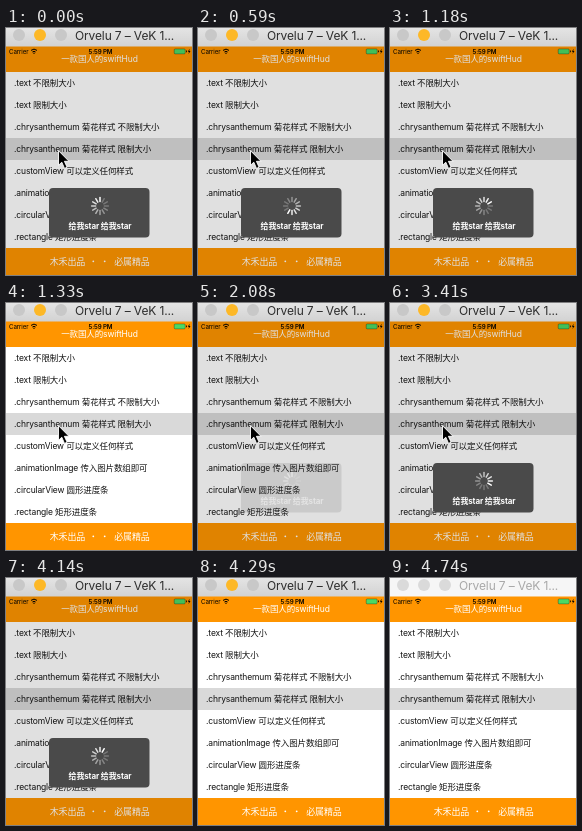
Animation, 186 px wide and 247 px high, one loop 4840 ms. Source, as an HTML page:

```html
<!DOCTYPE html>
<html lang="zh-CN">
<head>
<meta charset="utf-8">
<style>
  html, body { margin: 0; height: 100%; overflow: hidden; background: #fff; }
  svg { display: block; width: 100vw; height: 100vh; }
  text { font-family: Inter, "Noto Sans CJK SC", "Noto Sans CJK", sans-serif; letter-spacing: -.13px; white-space: pre; }
  #list { font-size: 8.5px; fill: #111; }
  .bar { fill: #ff9500; }
  .caption { font-size: 9px; fill: #fff; }
  .status { font-size: 6.2px; }
</style>
</head>
<body>
<svg viewBox="0 0 186 247">
  <defs>
    <linearGradient id="chrome" x2="0" y2="1">
      <stop stop-color="#e4e4e4"/><stop offset="1" stop-color="#d2d2d2"/>
    </linearGradient>
  </defs>
  <rect width="186" height="247" fill="#fff"/>
  <rect y="110" width="186" height="22" fill="#d9d9d9"/>
  <g id="list"></g>

  <rect class="bar" y="18" width="186" height="26"/>
  <text class="status" x="3" y="25.5">Carrier</text>
  <path d="M25 22.4q3-2.6 6 0M26.4 24q1.6-1.4 3.2 0" fill="none" stroke="#000"/>
  <circle cx="28" cy="25.2" r=".7"/>
  <text class="status" x="94.5" y="25.5" text-anchor="middle" font-weight="600">5:59 PM</text>
  <rect x="168.2" y="20.9" width="11" height="5" rx="1" fill="#4cd964" stroke="#000" stroke-width=".3"/>
  <path d="M180 22.5h.8v1.8h-.8zM183.6 20.8l-1.8 3h1.2l-.5 2.2 2-3h-1.2z"/>
  <text class="caption" x="93.5" y="34.3" text-anchor="middle" style="font-size:8.5px">一款国人的swiftHud</text>

  <rect class="bar" y="220" width="186" height="27"/>
  <text class="caption" x="43.7" y="236.5">木禾出品</text>
  <text class="caption" x="108.2" y="236.5">必属精品</text>
  <g fill="#fff"><circle cx="87.3" cy="233.3" r=".9"/><circle cx="98.7" cy="233.3" r=".9"/></g>

  <rect id="dim" y="18" width="186" height="229" opacity=".12"/>
  <g id="hud">
    <rect x="43" y="160" width="100.5" height="49.5" rx="4" fill="#4a4a4a"/>
    <g id="spinner" stroke="#fff" stroke-width="1.5" stroke-linecap="round"></g>
    <text x="94" y="201" text-anchor="middle" font-size="8" font-weight="bold" fill="#fff">给我star 给我star</text>
  </g>
  <path id="cursor" d="M52.5 122.7v14.6l3.3-3.1 2.7 6.2 2.6-1.2-2.7-5.9h4.6z" stroke="#fff" stroke-width=".9"/>

  <rect id="titleBar" width="186" height="18.5"/>
  <g id="lights"><circle cx="13" cy="7" r="6"/><circle cx="34" cy="7" r="6"/><circle cx="55" cy="7" r="6"/></g>
  <text id="title" x="69" y="12" font-size="12">Orvelu 7 – VeK 1...</text>
</svg>
<script>
const LOOP = 4840, TICK = 148;
const $ = id => document.getElementById(id);
const show = (id, on) => $(id).setAttribute('visibility', on ? 'visible' : 'hidden');
const fill = (node, color) => node.setAttribute('fill', color);

const rows = ['.text 不限制大小', '.text 限制大小', '.chrysanthemum 菊花样式 不限制大小',
  '.chrysanthemum 菊花样式 限制大小', '.customView 可以定义任何样式',
  '.animationImage 传入图片数组即可', '.circularView 圆形进度条', '.rectangle 矩形进度条'];
$('list').innerHTML = rows.map((row, i) => `<text x="8" y="${57.7 + 22 * i}">${row}</text>`).join('');

$('spinner').innerHTML = Array.from({ length: 12 }, (_, i) =>
  `<path d="M94 173.6v-4" transform="rotate(${i * 30} 94 178)"/>`).join('');
const petals = [...$('spinner').children];
const lights = [...$('lights').children];

function draw(t) {
  const sampled = Math.floor((t + 9) / TICK) * TICK;

  const busy = t < 1330 || (t >= 2080 && t < 4290);
  show('dim', busy);
  show('hud', busy);
  const p = t < 1330 ? 1 : Math.min(1, Math.max(0, (sampled - 2002) / 300));
  $('hud').setAttribute('opacity', p * p * (3 - 2 * p));

  const head = Math.floor(sampled * 12 / 1000);
  petals.forEach((petal, i) =>
    petal.setAttribute('opacity', Math.max(.25, 1 - ((head - i + 120) % 12) * .085)));

  show('cursor', t < 3560);

  const active = t < 4740;
  fill($('titleBar'), active ? 'url(#chrome)' : '#f6f6f6');
  fill($('title'), active ? '#2c2c2c' : '#a8a8a8');
  lights.forEach((light, i) => fill(light, !active ? '#dadada' : i === 1 ? '#fdb827' : '#c8c8c8'));
}

function frame() {
  draw(performance.now() % LOOP);
  requestAnimationFrame(frame);
}
frame();
</script>
</body>
</html>
```
